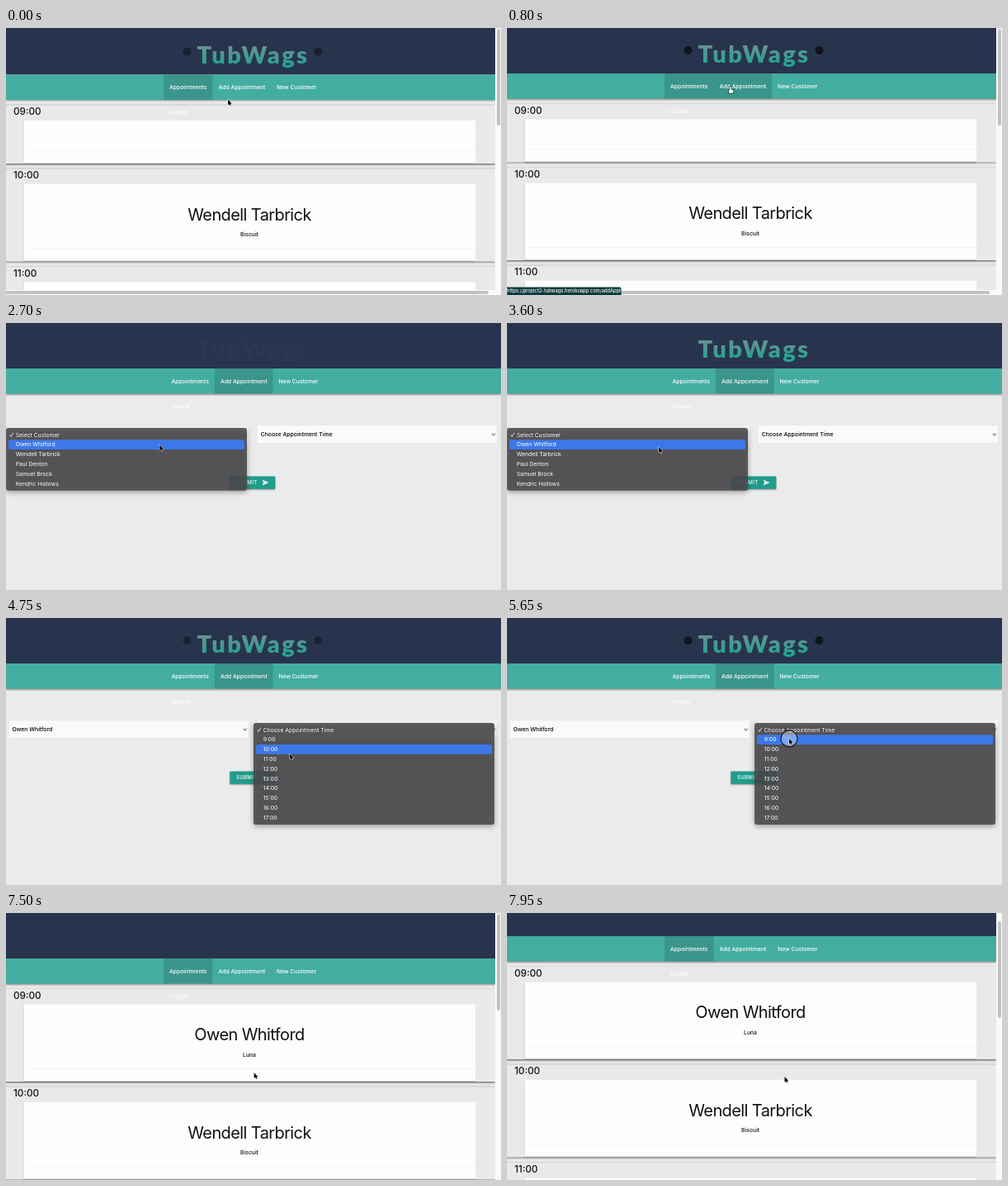
Recreate the animation shown at these times as an HTML page with a canvas. Size 600 px wide and 323 px high, loop 8 s.

```html
<!DOCTYPE html>
<html lang="en">
<head>
<meta charset="utf-8">
<title>Grooming appointments</title>
<style>
  html, body { margin: 0; width: 100%; height: 100%; overflow: hidden; background: #ebebeb; }
  canvas { display: block; width: 600px; height: 323px; }
</style>
</head>
<body>
<canvas id="stage"></canvas>
<script>
const W = 600, H = 323, LOOP = 8000;
const canvas = document.getElementById('stage');
const ctx = canvas.getContext('2d');
const dpr = window.devicePixelRatio || 1;
canvas.width = Math.round(W * dpr);
canvas.height = Math.round(H * dpr);

const SANS = 'Inter, Roboto, sans-serif';
const NAVY = '#28344d', TEAL = '#43ada0', PAPER = '#fdfdfd', PAGE = '#ebebeb', THUMB = '#c1c1c1';
const CUSTOMERS = ['Select Customer', 'Owen Whitford', 'Wendell Tarbrick',
  'Paul Denton', 'Samuel Brock', 'Kendric Hollows'];
const TIMES = ['Choose Appointment Time',
  ...Array.from({ length: 9 }, (_, i) => `${i + 9}:00`)];

const ROW = 11.8, ROWS_TOP = 129.4;
const rowY = i => ROWS_TOP + i * ROW;

// Pointer moves: when each starts and ends, where it leads, when it clicks there
const addLink = { from: 350, to: 700, x: 271, y: 71, click: 1200 };
const customerBox = { from: 1450, to: 1850, x: 197, y: 136, click: 1920 };
const customerRow = { from: 2150, to: 2900, x: 184, y: rowY(1.75), click: 3660 };
const timeBox = { from: 3780, to: 4020, x: 344, y: 137, click: 4020 };
const wrongRow = { from: 4200, to: 4700, x: 344, y: rowY(2.95) };
const timeRow = { from: 5000, to: 5450, x: 342, y: rowY(1.4), click: 5600 };
const submit = { from: 5760, to: 6450, x: 299, y: 193, click: 6900 };
const rest = { from: 7450, to: 7850, x: 336.5, y: 198 };
const MOVES = [addLink, customerBox, customerRow, timeBox, wrongRow, timeRow, submit, rest];
const PRESS = 150, LOAD = 300;
const FORM_AT = addLink.click + LOAD, HOME_AT = submit.click + LOAD + 200;

const ramp = (t, a, b) => Math.max(0, Math.min(1, (t - a) / (b - a)));
const ease = (t, a, b) => { const k = ramp(t, a, b); return k * k * (3 - 2 * k); };
const pulse = (t, a, b, fade) => ramp(t, a, a + fade) * (1 - ramp(t, b, b + fade));

function pointer(t) {
  return MOVES.reduce((p, m) => {
    const k = ease(t, m.from, m.to);
    return { x: p.x + (m.x - p.x) * k, y: p.y + (m.y - p.y) * k };
  }, { x: 269, y: 86.5 });
}

function rect(x, y, w, h, fill, radius = 0) {
  ctx.fillStyle = fill;
  ctx.beginPath();
  ctx.roundRect(x, y, w, h, radius);
  ctx.fill();
}

function raised(x, y, w, h, fill, { radius = 0, dy = 1, blur = 2, dark = 0.4 } = {}) {
  ctx.save();
  ctx.shadowColor = `rgba(0,0,0,${dark})`;
  ctx.shadowBlur = blur * dpr;
  ctx.shadowOffsetY = dy * dpr;
  rect(x, y, w, h, fill, radius);
  ctx.restore();
}

function label(str, x, y, { size = 6.8, fill = '#111', align = 'left', weight = 400, gap = 0 } = {}) {
  ctx.font = `${weight} ${size}px ${SANS}`;
  ctx.textAlign = align;
  ctx.textBaseline = 'middle';
  ctx.letterSpacing = `${gap}px`;
  ctx.fillStyle = fill;
  ctx.fillText(str, x, y + 0.3);
}

function trace(points) {
  ctx.beginPath();
  points.forEach(([x, y]) => ctx.lineTo(x, y));
}

function line(points, color, width) {
  ctx.strokeStyle = color;
  ctx.lineWidth = width;
  ctx.lineCap = ctx.lineJoin = 'round';
  trace(points);
  ctx.stroke();
}

function shape(points, fill) {
  ctx.fillStyle = fill;
  trace(points);
  ctx.fill();
}

function brand(top, alpha, dotAlpha) {
  ctx.save();
  ctx.globalAlpha = alpha;
  const paint = ctx.createLinearGradient(0, top + 20, 0, top + 45);
  paint.addColorStop(0, '#6b918f');
  paint.addColorStop(1, '#1ea595');
  ctx.font = '900 29px Lato, sans-serif';
  ctx.textAlign = 'center';
  ctx.textBaseline = 'alphabetic';
  ctx.letterSpacing = '2.4px';
  ctx.fillStyle = paint;
  ctx.fillText('TubWags', 299.5, top + 41.5);
  ctx.globalAlpha = dotAlpha;
  for (const side of [-1, 1]) rect(294 + side * 79.5, top + 22, 10, 10, '#10141c', 5);
  ctx.restore();
}

function header(top, width, dx, firstTab, secondTab) {
  const style = { fill: '#fff', weight: 500 };
  rect(0, 0, width, top + 55, NAVY);
  raised(0, top + 55, width, 30.5, TEAL);
  rect(191 + dx, top + 55, 59.5, 30.5, `rgba(0,0,0,${0.14 * firstTab})`);
  rect(250.5 + dx, top + 55, 70.5, 30.5, `rgba(0,0,0,${0.14 * secondTab})`);
  label('Appointments', 198 + dx, top + 70.3, style);
  label('Add Appointment', 257.5 + dx, top + 70.3, style);
  label('New Customer', 328 + dx, top + 70.3, style);
  label('Logout', 198 + dx, top + 100.3, style);
}

// Draws one hour of the day and returns where the next begins
function slot(y, time, name, pet) {
  const h = name ? 93 : 51.5, card = y + 18.5;
  raised(-4, y, 597, h + 19.2, '#e9e9e9', { blur: 2.5, dark: 0.7 });
  label(time, 9, y + 8.3, { size: 11.7, weight: 500 });
  raised(21.3, card, 548, h, PAPER, { dy: 0.8, blur: 1.6 });
  rect(26, card + h - 15, 543, 0.6, '#e8e8e8');
  if (name) {
    label(name, 295, card + 37.9, { size: 20, align: 'center', gap: -0.6 });
    label(pet, 295, card + 61.3, { align: 'center', weight: 500 });
  }
  return y + h + 25.5;
}

function homePage(t) {
  const booked = t >= HOME_AT;
  const scroll = booked ? 27 * ease(t, 7600, 7940) : 1.5 * (ease(t, 50, 350) - 1);
  const first = booked ? [CUSTOMERS[1], 'Luna'] : [];
  let y = slot(91.7 - scroll, '09:00', ...first);
  y = slot(y, '10:00', CUSTOMERS[2], 'Biscuit');
  slot(y, '11:00');
  header(-scroll, 593, 0, 1, booked ? 0 : ramp(t, 480, 740));
  if (!booked) brand(-scroll, 1, 0.65 + 0.35 * ramp(t, 0, 700));

  rect(593, 0, 7, H, '#fafafa');
  rect(595, 1 + Math.max(0, scroll) / 3, 4, 117, THUMB, 2);
  if (!booked) {
    rect(0, 317, W, 6, '#fafafa');
    rect(-3, 318, 588, 4, THUMB, 2);
  }
}

function select(x, text) {
  rect(x, 124.3, 290, 20.7, '#fafafa');
  label(text, x + 3.8, 134.6, { fill: '#000', weight: 500 });
  line([[x + 284, 134], [x + 285.9, 135.9], [x + 287.8, 134]], '#222', 0.9);
}

function submitButton(hover) {
  raised(271.3, 185.5, 55, 15.3, '#209c8b', { radius: 1 });
  rect(271.3, 185.5, 55, 15.3, `rgba(112,205,192,${hover})`, 1);
  label('SUBMIT', 279, 192.9, { size: 6.1, fill: '#fff', weight: 500, gap: 0.3 });
  shape([[310.5, 189.8], [318.5, 193.1], [310.5, 196.4], [312.3, 193.1]], '#fff');
}

function menu(x, items, open, close, t) {
  if (t < open || t > close + PRESS) return;
  const active = Math.floor((pointer(t).y - ROWS_TOP) / ROW);
  ctx.save();
  ctx.globalAlpha = 1 - ramp(t, close, close + PRESS);
  raised(x, 127, 292, items.length * ROW + 5, 'rgba(74,73,77,.88)', { radius: 3, dy: 2, blur: 6 });
  rect(x + 3, rowY(Math.max(0, active)), 286, ROW, '#3d78e8', 2);
  items.forEach((item, i) => label(item, x + 11.7, rowY(i + 0.5), { fill: '#fff' }));
  line([[x + 4.8, 135.6], [x + 6.2, 137.4], [x + 8.8, 133]], '#fff', 0.8);
  ctx.restore();
}

function formPage(t) {
  const customerSet = customerRow.click + 100, timeSet = timeRow.click + 100;
  header(0, W, 2.4, 0, 1);
  brand(0, ease(t, 2600, 3450), ramp(t, 3700, 5600));
  select(3.8, CUSTOMERS[t < customerSet ? 0 : 1]);
  select(305, TIMES[t < timeSet ? 0 : 1]);
  submitButton(ramp(t, submit.to - 150, submit.to));
  menu(0, CUSTOMERS, customerBox.click + 230, customerSet, t);
  menu(300, TIMES, timeBox.click + 130, timeSet, t);
}

function statusBubble(t) {
  ctx.save();
  ctx.globalAlpha = pulse(t, 550, 2250, 150);
  rect(0, 313.5, 138.5, 10, '#073a3c', [0, 2, 0, 0]);
  label('https://project2-tubwags.herokuapp.com/addAppt', 0, 318.2, { size: 5.7, fill: '#fff', weight: 500 });
  ctx.restore();
}

function clickRing() {
  ctx.beginPath();
  ctx.arc(0, 0, 10, 0, Math.PI * 2);
  ctx.fillStyle = 'rgba(255,255,255,.35)';
  ctx.fill();
  ctx.strokeStyle = '#111';
  ctx.lineWidth = 1.1;
  ctx.stroke();
}

function arrow() {
  const head = [[0, 0], [0, 6.4], [4.6, 4.7], [0, 0]], tail = [[1.8, 4], [3, 7]];
  line(head, '#fff', 0.9);
  line(tail, '#fff', 1.9);
  shape(head, '#000');
  line(tail, '#000', 1.1);
}

// Outline first, then the white fill, so finger and palm join
function hand() {
  for (const [edge, fill] of [[0.5, '#111'], [0, '#fff']]) {
    rect(-0.8 - edge, -edge, 1.6 + 2 * edge, 5 + 2 * edge, fill, 0.8);
    rect(-2.2 - edge, 3.4 - edge, 5.6 + 2 * edge, 4.4 + 2 * edge, fill, 1.5);
  }
}

function cursor(t) {
  const { x, y } = pointer(t);
  const overLink = [[addLink, customerBox], [submit, rest]]
    .some(([on, off]) => t > on.to - 100 && t < off.from + 50);
  ctx.save();
  ctx.translate(x, y);
  if (MOVES.some(m => t >= m.click && t < m.click + PRESS)) clickRing();
  if (overLink) hand(); else arrow();
  ctx.restore();
}

function draw(t) {
  ctx.setTransform(dpr, 0, 0, dpr, 0, 0);
  rect(0, 0, W, H, PAGE);
  if (t >= FORM_AT && t < HOME_AT) formPage(t);
  else homePage(t);
  statusBubble(t);
  cursor(t);
}

const start = performance.now();
function tick() {
  draw((performance.now() - start) % LOOP);
  requestAnimationFrame(tick);
}
tick();
</script>
</body>
</html>
```
